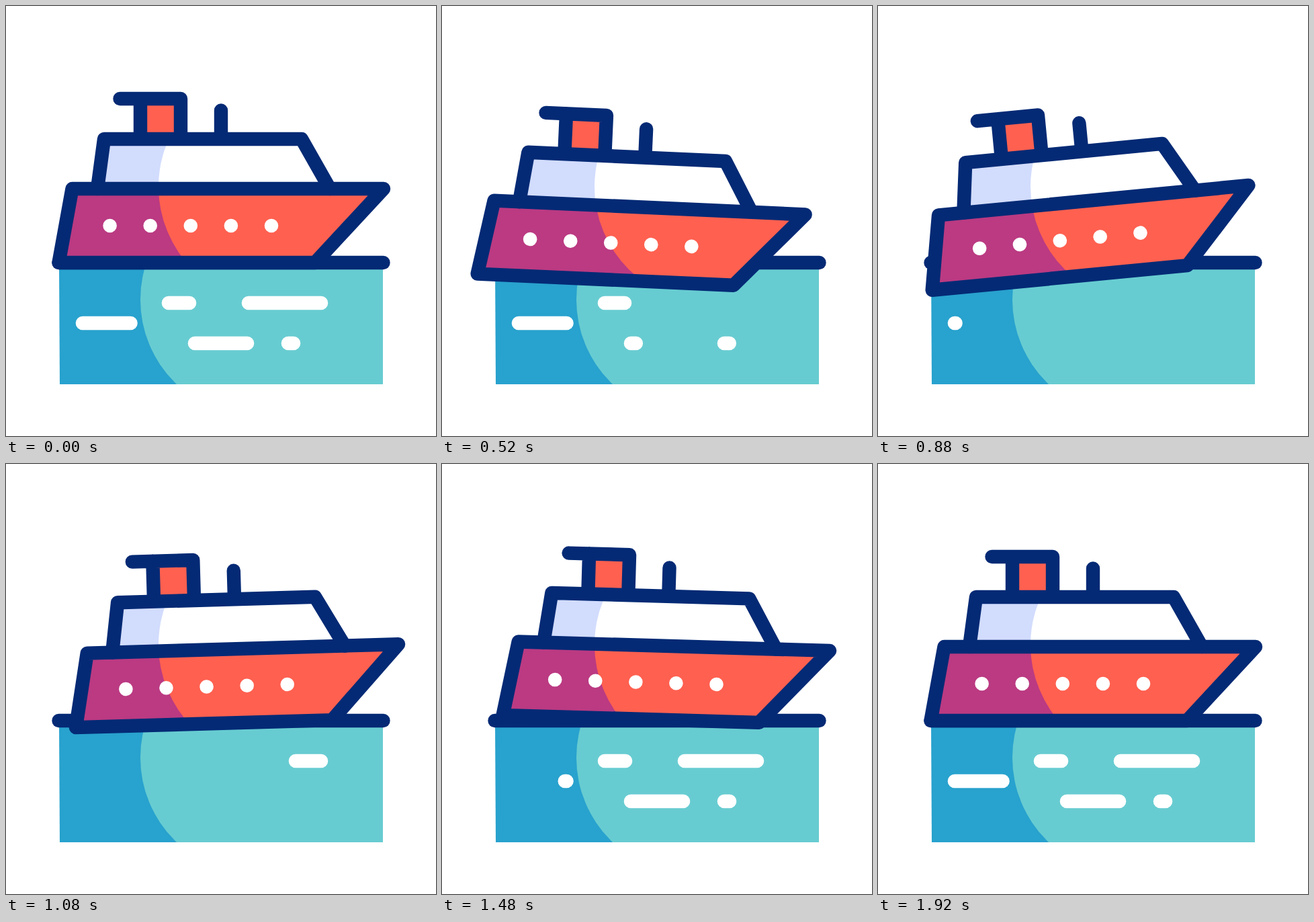
Write an HTML page that moves like this. It is 640 by 640 pixels and loops after 2000 ms.

```html
<!DOCTYPE html>
<html lang="en">
<head>
<meta charset="utf-8">
<title>Ship on the waves</title>
<style>
  html, body { margin: 0; width: 100%; height: 100%; overflow: hidden; background: #fff; }
  svg { display: block; width: 100vw; height: 100vh; }
  .line { fill: none; stroke: #042a75; stroke-width: 20.4; stroke-linecap: round; stroke-linejoin: round; }
  #waves { fill: none; stroke: #fff; stroke-width: 20.6; stroke-linecap: round; }
  #ports { stroke: #fff; stroke-width: 20.6; stroke-linecap: round; stroke-dasharray: 0 60.1; }
</style>
</head>
<body>
<svg viewBox="0 0 640 640">
  <defs>
    <path id="hull" d="M98.5 272H562L460 382H78.5Z"/>
    <path id="cabin" d="M136 272L146 198H440L482 272"/>
    <path id="sea" d="M79 382H561V563H80Z"/>
    <!-- lit side: round on the left, open to the right -->
    <path id="light" d="M401 95A174 174 0 0 0 401 443H700V95Z"/>
    <clipPath id="inHull"><use href="#hull"/></clipPath>
    <clipPath id="inCabin"><use href="#cabin"/></clipPath>
    <clipPath id="inSea"><use href="#sea"/></clipPath>
  </defs>

  <use href="#sea" fill="#28a2ce"/>
  <g clip-path="url(#inSea)"><use href="#light" x="-27" y="168" fill="#67ccd1"/></g>
  <!-- data-turn: place in the order of leaving and coming back -->
  <g id="waves">
    <path data-turn="0" pathLength="1" d="M361 442H469"/>
    <path data-turn="1" pathLength="1" d="M281 502H359"/>
    <path data-turn="2" pathLength="1" d="M242 442H273"/>
    <path data-turn="2" pathLength="1" d="M420 502H428"/>
    <path data-turn="3" pathLength="1" d="M114 472H185.500"/>
  </g>
  <path class="line" d="M78.500 382H561.500"/>

  <g id="ship">
    <path fill="#ff6050" d="M200 138H260V198H200Z"/>
    <path class="line" d="M169.500 138H260V196M200 138V196M320 155.500V196"/>
    <use href="#cabin" fill="#d2dcfd"/>
    <g clip-path="url(#inCabin)"><use class="still" href="#light" fill="#fff"/></g>
    <use href="#hull" fill="#bb3a82"/>
    <g clip-path="url(#inHull)"><use class="still" href="#light" fill="#ff6050"/></g>
    <use href="#cabin" class="line"/>
    <use href="#hull" class="line"/>
    <path id="ports" d="M154.600 327h241"/>
  </g>
</svg>
<script>
  const LOOP = 2000, STEP = 40, TRIM = 240;
  const ship = document.getElementById('ship');
  const still = document.querySelectorAll('.still');
  const waves = document.querySelectorAll('#waves path');

  // 0 before start, 1 after end, smooth between
  function ramp(t, start, end) {
    const p = Math.min(1, Math.max(0, (t - start) / (end - start)));
    return p * p * (3 - 2 * p);
  }

  function moveShip(t) {
    const x = -26.7 * ramp(t, 0, 572) + 57.9 * ramp(t, 572, 1205) - 31.2 * ramp(t, 1205, 1680);
    const y = 29.5 * ramp(t, 0, 620) - 32.1 * ramp(t, 620, 1250) + 2.6 * ramp(t, 1250, 1680);
    const tilt = 3.3 * ramp(t, 0, 450) - 8.9 * ramp(t, 450, 850)
      + 7.9 * ramp(t, 850, 1310) - 2.3 * ramp(t, 1310, 1800);
    ship.setAttribute('transform', `translate(${x} ${y}) rotate(${tilt} 320 382)`);
    // undo the ship's motion so the light stays in place
    const undo = `rotate(${-tilt} 320 382) translate(${-x} ${-y})`;
    still.forEach(el => el.setAttribute('transform', undo));
  }

  // each wave shrinks to its left end, then grows back from its right end
  function trimWave(wave, t) {
    const turn = +wave.dataset.turn;
    const leave = 160 + 167 * turn;
    const back = 984 + 26 * turn * (turn + 3);
    const growing = t >= back;
    const part = growing ? ramp(t, back, back + TRIM) : 1 - ramp(t, leave, leave + TRIM);
    wave.style.visibility = part > 0 ? 'visible' : 'hidden';
    wave.style.strokeDasharray = `${part} 2`;
    wave.style.strokeDashoffset = growing ? part - 1 : 0;
  }

  function tick() {
    const t = Math.floor(performance.now() % LOOP / STEP) * STEP;
    moveShip(t);
    waves.forEach(wave => trimWave(wave, t));
    requestAnimationFrame(tick);
  }
  tick();
</script>
</body>
</html>
```
